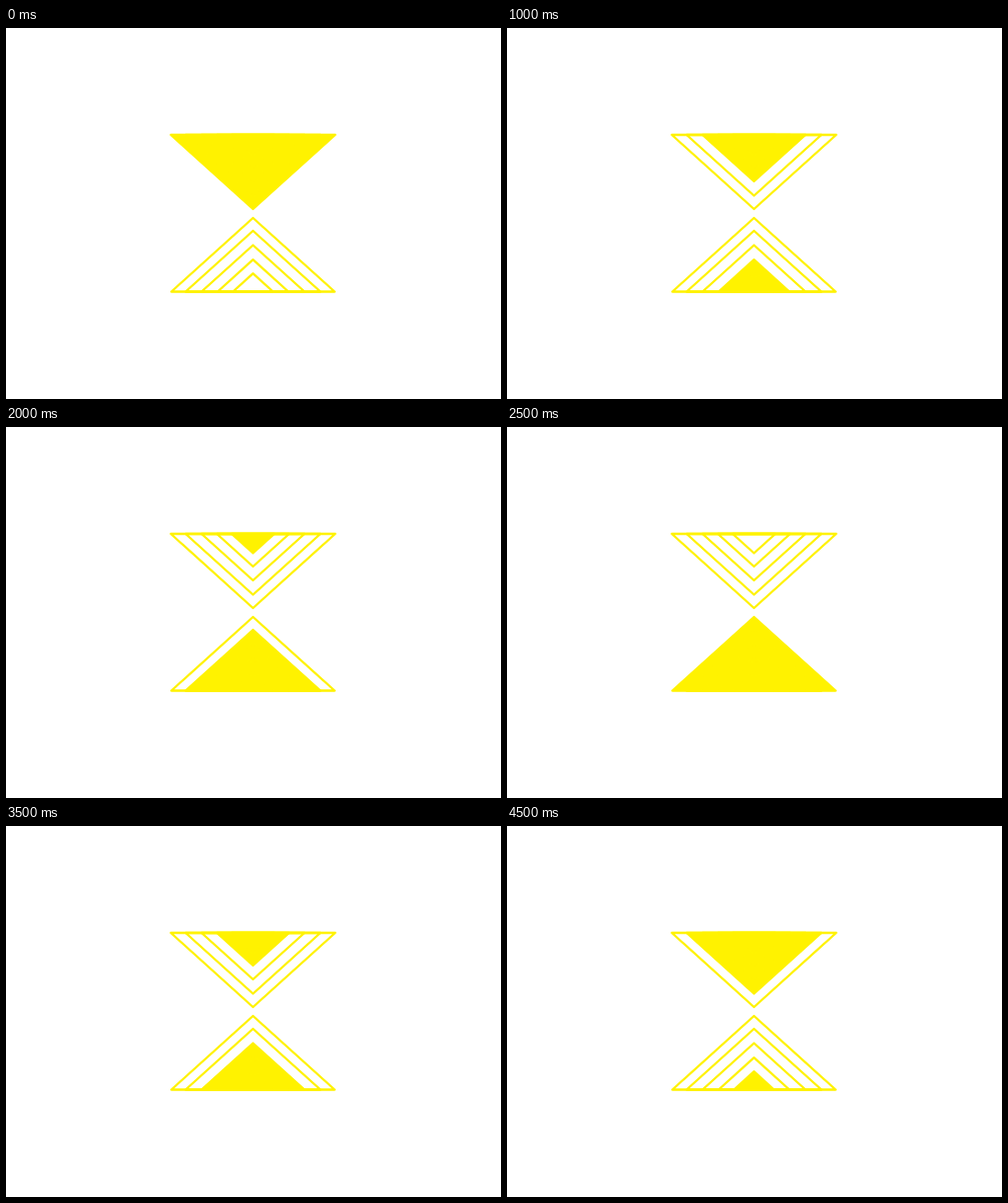
An HTML page that plays this animation: 500 px wide and 375 px high, repeating every 5 s.

```html
<!DOCTYPE html>
<html lang="en">
<head>
<meta charset="utf-8">
<title>Hourglass</title>
<style>
  html, body { margin: 0; width: 100%; height: 100%; overflow: hidden; background: #fff; }
  svg { display: block; width: 500px; height: 375px; }
  path { stroke: #fff200; stroke-width: 2.3; stroke-linejoin: round; }
</style>
</head>
<body>
<svg viewBox="0 0 500 375"></svg>
<script>
const svg = document.querySelector('svg');
const CENTER = 249.5, SLOPE = 1.107, LEVELS = 5, STEP_MS = 500;

// Nested triangles, outermost first, sharing one base line.
function makeStack(baseY, direction, heights) {
  return heights.map(height => {
    const half = height * SLOPE;
    const path = document.createElementNS('http://www.w3.org/2000/svg', 'path');
    path.setAttribute('d',
      `M${CENTER - half} ${baseY}H${CENTER + half}L${CENTER} ${baseY + direction * height}Z`);
    return svg.appendChild(path);
  });
}

const topStack = makeStack(108, 1, [75, 61.5, 47, 33, 19.5]);
const bottomStack = makeStack(266.5, -1, [74.5, 61.5, 47, 32.3, 18.3]);

function fillFrom(stack, level) {
  stack.forEach((path, i) => path.setAttribute('fill', i >= level ? '#fff200' : 'none'));
}

// The sand drains one level per step, then runs back.
function draw(now) {
  const step = Math.floor(now / STEP_MS) % (2 * LEVELS);
  const drained = LEVELS - Math.abs(LEVELS - step);
  fillFrom(topStack, drained);
  fillFrom(bottomStack, LEVELS - drained);
}

const start = performance.now();
function tick() {
  draw(performance.now() - start);
  requestAnimationFrame(tick);
}
tick();
</script>
</body>
</html>
```
